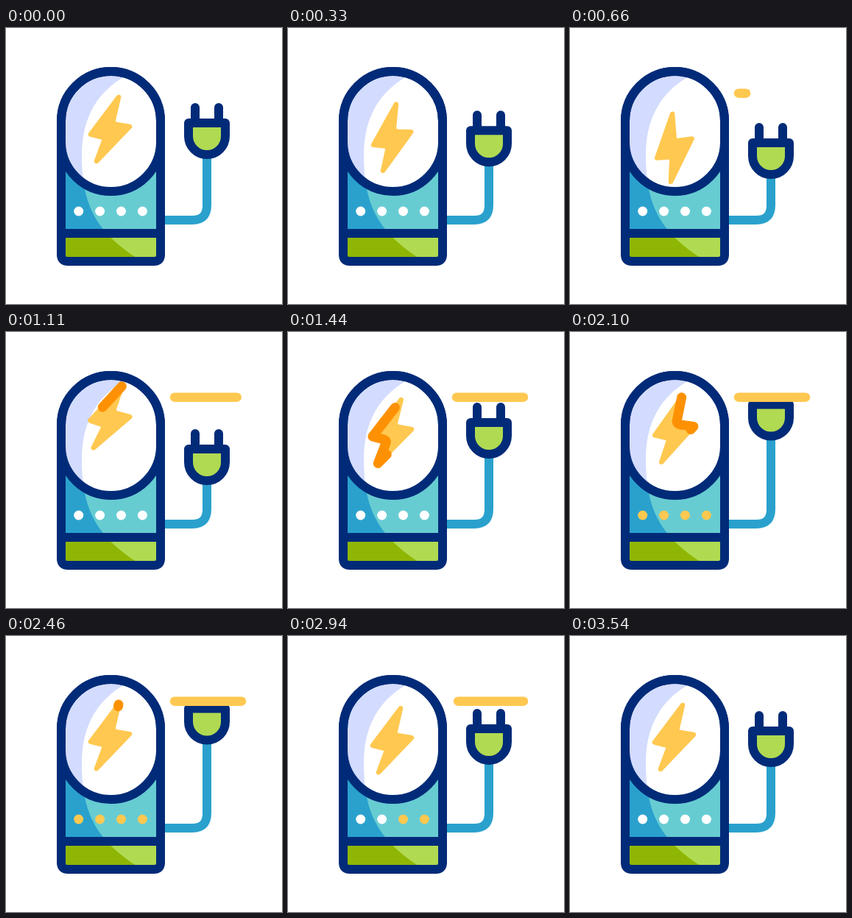
An HTML page for the animation above (3600 ms loop, 375x375 px).

```html
<!DOCTYPE html>
<html lang="en">
<head>
<meta charset="utf-8">
<title>Charging station</title>
<style>
  html, body { margin: 0; width: 100%; height: 100%; overflow: hidden; background: #fff; }
  svg { display: block; width: 100vw; height: 100vh; }
  .line { fill: none; stroke-width: 12; stroke-linejoin: round; }
  .navy { stroke: #012b78; }
  .round { stroke-linecap: round; }
</style>
</head>
<body>
<svg viewBox="0 0 375 375">
  <defs>
    <path id="body" d="M75 126.5a67.5 67.5 0 0 1 135 0V308q0 9 -9 9H84q-9 0 -9 -9Z"/>
    <path id="window" d="M75 126.5a67.5 67.5 0 0 1 135 0V154.500a67.5 67.5 0 0 1 -135 0Z"/>
    <path id="lit" d="M165 64C115 90 103 135 103 172C103 235 118 275 180 314H230V64Z"/>
    <path id="boltShape" d="M153 94L115 144.500L129 148Q135 149 133 154L123 181L168 134L150 131Q144 129 146 124Z"/>
    <clipPath id="inBody"><use href="#body"/></clipPath>
    <clipPath id="inWindow"><use href="#window"/></clipPath>
    <clipPath id="inLit"><use href="#lit"/></clipPath>
    <clipPath id="belowSocket"><rect y="89" width="375" height="286"/></clipPath>
  </defs>

  <path id="cable" class="line" stroke="#2aa1cd"/>

  <g clip-path="url(#inBody)">
    <path fill="#2aa1cd" d="M70 150H215V279H70Z"/>
    <path fill="#8fb604" d="M70 279H215V320H70Z"/>
    <g clip-path="url(#inLit)">
      <path fill="#67ccd2" d="M70 150H215V279H70Z"/>
      <path fill="#b0da51" d="M70 279H215V320H70Z"/>
    </g>
    <use href="#window" fill="#d3dcfe"/>
    <g clip-path="url(#inWindow)"><use href="#lit" fill="#fff"/></g>
  </g>
  <path class="line navy" d="M75 279H210"/>
  <use href="#window" class="line navy"/>
  <use href="#body" class="line navy"/>
  <g id="lamps"></g>

  <g id="bolt">
    <use href="#boltShape" fill="#ffc850" stroke="#ffc850" stroke-width="6.500" stroke-linejoin="round"/>
    <path id="trace" class="line round" stroke="#fe9103" style="stroke-width:13"/>
  </g>

  <g clip-path="url(#belowSocket)">
    <g id="plug">
      <path class="line navy round" d="M257 108V128M289 108V128"/>
      <path class="line navy" style="fill:#b0da51" d="M248 129H298V147a25 25 0 0 1 -50 0Z"/>
    </g>
  </g>
  <path id="socket" class="line round" stroke="#ffc850" style="stroke-width:12.500"/>
</svg>
<script>
const LOOP = 3600;
const $ = id => document.getElementById(id);

// Tracks are [time, value] steps, eased between neighbours.
const tracks = {
  plug: [[0, 0], [830, 30], [1110, 30], [1700, -30.5], [2460, -30.5], [3065, 0]],
  boltY: [[0, 0], [720, 24.5], [1140, -22], [1740, 17.5], [2160, -6], [2790, 5], [3400, 0]],
  boltTurn: [[0, 0], [720, -18], [1140, 6], [1740, -4], [2400, 0]],
  traceHead: [[790, 0], [2010, 1]],
  traceTail: [[1240, 0], [2560, 1]],
  socketEnd: [[503, 229], [1235, 320]],
  socketStart: [[2880, 229], [3510, 320]]
};

const ease = x => (1 - Math.cos(Math.PI * x)) / 2;

function at(track, t) {
  if (t <= track[0][0]) return track[0][1];
  for (let i = 1; i < track.length; i++) {
    const [t0, a] = track[i - 1], [t1, b] = track[i];
    if (t < t1) return a + (b - a) * ease((t - t0) / (t1 - t0));
  }
  return track[track.length - 1][1];
}

const lamps = [0, 1, 2, 3].map(i => {
  const lamp = document.createElementNS("http://www.w3.org/2000/svg", "circle");
  lamp.setAttribute("cx", 98.7 + i * 28.9);
  lamp.setAttribute("cy", 249);
  lamp.setAttribute("r", 6.5);
  return $("lamps").appendChild(lamp);
});

const trace = $("trace");
trace.setAttribute("d", $("boltShape").getAttribute("d"));
const outline = trace.getTotalLength();

function draw(t) {
  const v = {};
  for (const name in tracks) v[name] = at(tracks[name], t);

  $("plug").setAttribute("transform", `translate(0 ${v.plug})`);
  $("cable").setAttribute("d", `M213 261H253Q273 261 273 241V${170 + v.plug}`);

  $("bolt").setAttribute("transform", `translate(0 ${v.boltY}) rotate(${v.boltTurn} 142 138)`);
  const drawn = Math.max(0.01, (v.traceHead - v.traceTail) * outline);
  trace.style.strokeDasharray = `${drawn} ${outline * 2}`;
  trace.style.strokeDashoffset = -v.traceTail * outline;
  trace.style.display = t > 790 && t < 2560 ? "" : "none";

  $("socket").setAttribute("d", `M${v.socketStart} 88.7H${v.socketEnd + 0.01}`);
  $("socket").style.display = t > 503 && t < 3510 ? "" : "none";

  lamps.forEach((lamp, i) => {
    const on = t >= 1560 + i * 180 && t < 2640 + i * 180;
    lamp.setAttribute("fill", on ? "#ffc850" : "#fff");
  });
}

const begin = performance.now();
function tick() {
  draw((performance.now() - begin) % LOOP);
  requestAnimationFrame(tick);
}
draw(0);
requestAnimationFrame(tick);
</script>
</body>
</html>
```
